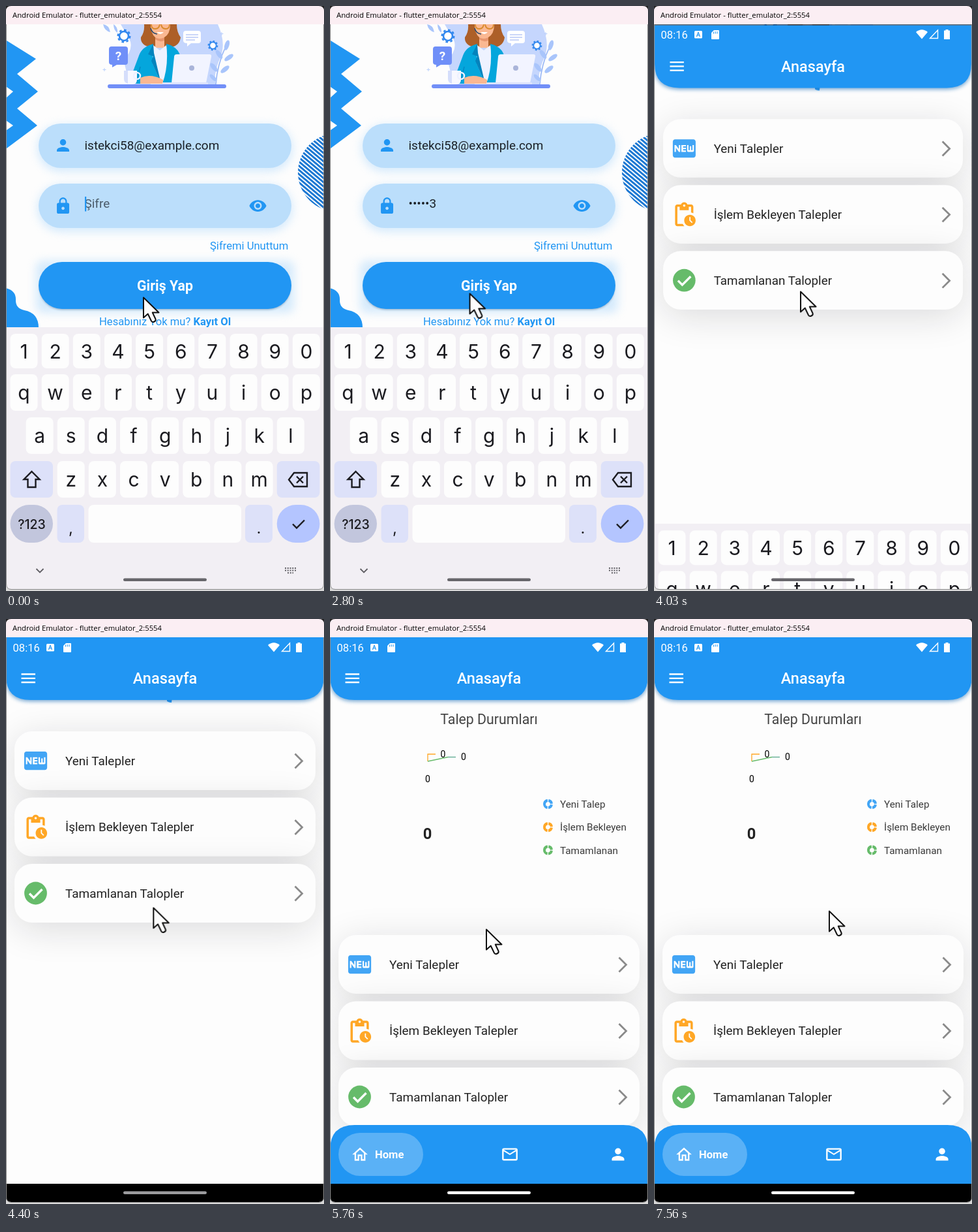
Recreate the animation shown at these times as an HTML page. Size 488 by 896 pixels, loop 7660 ms.

```html
<!DOCTYPE html>
<html lang="tr">
<head>
<meta charset="utf-8">
<title>Anasayfa</title>
<style>
html, body { margin: 0; width: 100%; height: 100%; overflow: hidden; background: #d9d9d9; }
svg { display: block; font-family: Roboto, sans-serif; }
.mid { text-anchor: middle; }
.blue { fill: #2196f3; }
.white { fill: #fff; }
.page { fill: #fdfdfd; }
.b { font-weight: 700; }
.t16 { font-size: 16.6px; }
.t19 { font-size: 18.95px; }
.t21 { font-size: 21.3px; }
.t15 { font-size: 15.3px; }
.t14 { font-size: 14px; }
.keys { font-family: Inter, sans-serif; font-size: 30px; fill: #1b1b20; text-anchor: middle; }

.login, .home, .fade, .scrim, .keys, .before, .after, .late, .early, .cards,
.bar, .pill, .cursor, .ripple, .arc, .spin { animation: 7660ms linear infinite; }
.login, .home { transform-origin: 244px 460px; }
.login { animation-name: zoomOut; }
.home { animation-name: zoomIn; }
.fade { animation-name: fadeIn; }
.scrim { animation-name: dim; }
.keys { animation-name: drop; }
.before { animation-name: idle; }
.after { animation-name: busy; }
.early { animation-name: early; }
.late { animation-name: late; }
.cards { animation-name: push; }
.bar { animation-name: bar; }
.pill { animation-name: pill; }
.cursor { animation-name: move; }
.ripple { animation-name: ripple; transform-origin: 216px 438px; }
.arc { animation-name: arc; }
.spin { animation-name: spin; transform-origin: 157px 428px; }

@keyframes zoomOut {
  0%, 50.31% { transform: scale(1); animation-timing-function: cubic-bezier(.3,0,.8,.15); }
  50.97% { transform: scale(1.02); animation-timing-function: cubic-bezier(.05,.7,.1,1); }
  54.23%, 100% { transform: scale(1.05); }
}
@keyframes zoomIn {
  0%, 50.31% { transform: scale(.85); animation-timing-function: cubic-bezier(.3,0,.8,.15); }
  50.97% { transform: scale(.91); animation-timing-function: cubic-bezier(.05,.7,.1,1); }
  54.23%, 100% { transform: scale(1); }
}
@keyframes fadeIn { 0%, 50.8% { opacity: 0; } 51.29%, 100% { opacity: 1; } }
@keyframes dim { 0%, 51.12% { opacity: 0; } 51.95%, 100% { opacity: .6; } }
@keyframes drop {
  0%, 50.47% { transform: translateY(0); animation-timing-function: cubic-bezier(.4,0,1,1); }
  53.08%, 100% { transform: translateY(410px); }
}
@keyframes idle { 0%, 37.59% { opacity: 1; } 37.6%, 100% { opacity: 0; } }
@keyframes busy { 0%, 37.59% { opacity: 0; } 37.6%, 100% { opacity: 1; } }
@keyframes early { 0%, 72.18% { opacity: 1; } 72.19%, 100% { opacity: 0; } }
@keyframes late { 0%, 72.18% { opacity: 0; } 72.19%, 100% { opacity: 1; } }
@keyframes push { 0%, 72.18% { transform: translateY(0); } 72.19%, 100% { transform: translateY(312px); } }
@keyframes bar { 0%, 53.51% { opacity: 0; } 53.52%, 100% { opacity: 1; } }
@keyframes pill { 0%, 53.52% { fill: #67666b; } 64.75%, 100% { fill: #fff; } }
@keyframes ripple {
  0%, 37.2% { transform: scale(0); opacity: .14; }
  41% { transform: scale(1); opacity: .1; }
  43.08%, 100% { transform: scale(1); opacity: 0; }
}
@keyframes arc {
  0%, 37.6% { stroke-dasharray: 0 360; stroke-dashoffset: 0; animation-timing-function: cubic-bezier(.4,0,.2,1); }
  46.31% { stroke-dasharray: 270 360; stroke-dashoffset: 0; animation-timing-function: cubic-bezier(.4,0,.2,1); }
  55%, 100% { stroke-dasharray: 0 360; stroke-dashoffset: -270; }
}
@keyframes spin { 0%, 37.6% { transform: rotate(-90deg); } 55%, 100% { transform: rotate(216deg); } }
@keyframes move {
  0%, 2.09% { transform: translate(209px,445px); }
  4.7%, 33.42% { transform: translate(209px,444.5px); }
  36.55% { transform: translate(212.5px,439px); }
  43.08% { transform: translate(221px,436px); }
  45.69% { transform: translate(222px,436px); }
  52.61% { transform: translate(223px,436px); }
  63.45% { transform: translate(226px,447px); }
  66.58% { transform: translate(235px,464px); }
  69.97%, 77.42% { transform: translate(238px,474px); }
  83.55%, 87.47% { transform: translate(295px,495px); }
  88.25% { transform: translate(289px,494px); }
  95.3%, 100% { transform: translate(267px,446px); }
}
</style>
</head>
<body>
<svg width="488" height="896" viewBox="0 0 488 896">
<defs>
  <clipPath id="screen"><path d="M0 28H488V885Q488 893 480 893H8Q0 893 0 885Z"/></clipPath>
  <clipPath id="button"><rect x="50" y="392" width="388" height="72" rx="36"/></clipPath>
  <pattern id="stripes" width="6" height="4.9" patternUnits="userSpaceOnUse" patternTransform="rotate(40)">
    <rect width="6" height="2.900" fill="#1976d2"/>
  </pattern>
  <path id="person" d="M12 12c2.21 0 4-1.79 4-4s-1.79-4-4-4-4 1.79-4 4 1.79 4 4 4zm0 2c-2.67 0-8 1.34-8 4v2h16v-2c0-2.66-5.33-4-8-4z"/>
  <path id="chevron" d="M443.5 206.5l11 11-11 11" fill="none" stroke="#8a8a8a" stroke-width="2.8"/>
  <circle id="ring" r="5.500" fill="none" stroke-width="4" pathLength="100" stroke-dasharray="46 4 21 4 21 4" transform="rotate(98)"/>
  <g id="gear" fill="none" stroke="#2f86ee">
    <circle r="7" stroke-width="2.6" fill="#fff"/>
    <circle r="9.3" stroke-width="2.4" pathLength="80" stroke-dasharray="5 5"/>
  </g>
  <g id="sprig" fill="#a9c5fb">
    <path d="M0 0Q2-30 16-60" fill="none" stroke="#8fb0f5" stroke-width="1.5"/>
    <ellipse cx="17" cy="-60" rx="3.5" ry="8" transform="rotate(18 17 -60)"/>
    <ellipse cx="5" cy="-46" rx="3.5" ry="8" transform="rotate(-35 5 -46)"/>
    <ellipse cx="20" cy="-41" rx="3.5" ry="8" transform="rotate(55 20 -41)"/>
    <ellipse cx="-3" cy="-26" rx="3.5" ry="8" transform="rotate(-40 -3 -26)"/>
    <ellipse cx="14" cy="-23" rx="3.5" ry="8" transform="rotate(52 14 -23)"/>
    <ellipse cx="-4" cy="-10" rx="3" ry="7" transform="rotate(-45 -4 -10)"/>
  </g>
</defs>

<rect width="488" height="30" fill="#222"/>
<path d="M0 30V8Q0 0 8 0H480Q488 0 488 8V30Z" fill="#fbeef3"/>
<text x="10" y="18" font-size="11.3" style="font-family:'Open Sans',sans-serif">Android Emulator - flutter_emulator_2:5554</text>

<g clip-path="url(#screen)">
<g class="login">
  <rect class="page" y="28" width="488" height="868"/>
  <path class="blue" d="M1 53L46 81 17 104 49 131 17 157 48 183 1 218V190L11 183 1 176V140L11 131 1 124Z"/>
  <circle cx="508" cy="255" r="60" fill="url(#stripes)"/>
  <path class="blue" d="M0 432Q15 436 15 449Q14 463 28 466Q50 470 50 493H0Z"/>

  <g>
    <path d="M176 28H325Q340 60 326 86Q318 108 322 121H188Q186 100 180 84Q196 66 190 52Z" fill="#c5d6fd"/>
    <path d="M149 28Q158 29 160 40Q151 38 149 28ZM165 28q7 4 6 13-6-4-6-13Z" fill="#a9c5fb"/>
    <use href="#sprig" transform="translate(322 120)"/>
    <path d="M212 28H262Q262 40 268 48Q266 62 252 63H222Q206 60 207 48Q213 40 212 28Z" fill="#ad5f28"/>
    <path d="M222 28H252Q252 43 243 48V64H229V48Q222 42 222 28Z" fill="#fab892"/>
    <path d="M229 48Q236 52 243 48V53Q236 56 229 51Z" fill="#e8966f"/>
    <path d="M223 28q0 7 6 7t7-7m2 0q1 7 7 7t6-7" fill="none" stroke="#d98a2b" stroke-width="1.8"/>
    <path d="M231 40q6 6 11 0Z" class="white"/>
    <path d="M222 34q2 8 10 9" fill="none" stroke="#26496f" stroke-width="1.5"/>
    <path d="M226 60L236 68 246 60 254 80 248 120H222L218 76Z" fill="#eef2ff"/>
    <path d="M226 58Q209 62 204 76L192 108Q192 119 202 119H238L225 88Z" fill="#04a6dc"/>
    <path d="M246 58Q264 62 268 78V119H240Q250 92 246 58Z" fill="#04a6dc"/>
    <path d="M226 58L218 74 226 77 223 84 238 119 227 72Z" fill="#0483bd"/>
    <path d="M206 110Q222 103 241 113V119H206Z" fill="#fab892"/>
    <path d="M206 93L200 118" stroke="#0389c4" stroke-width="1.5"/>
    <path d="M262 74H312Q316 74 315 78L307 118H254L258 78Q258 74 262 74Z" fill="#f2f4ff"/>
    <path d="M240 117H310V121H240Z" fill="#dbe2fc"/>
    <circle cx="285" cy="95" r="4" fill="#a9b4d9"/>
    <path d="M181 99H201V113Q201 120 194 120H188Q181 120 181 113Z" fill="#f7f8ff"/>
    <circle cx="201" cy="107" r="5" fill="none" stroke="#eef1ff" stroke-width="2.5"/>
    <path d="M181 99H187V119Q181 117 181 112Z" fill="#d5defb"/>
    <path d="M162 62H183Q187 62 187 66V86Q187 90 183 90H170L163 94V90Q158 90 158 86V66Q158 62 162 62Z" fill="#6f8ff8"/>
    <text x="172.5" y="83" class="white b mid" font-size="19">?</text>
    <path d="M276 38H295Q299 38 299 42V53Q299 57 295 57H284L278 62V57Q272 57 272 53V42Q272 38 276 38Z" fill="#fff"/>
    <path d="M276 44H295M276 48H295M276 52H290" stroke="#b9c9f6" stroke-width="1.5"/>
    <use href="#gear" x="181" y="46"/>
    <use href="#gear" transform="translate(317.5 60.5) scale(.75)"/>
    <path d="M151 95v5m-2.5-2.5h5M331 40v5m-2.5-2.5h5" stroke="#b9cffc"/>
    <rect x="156" y="120" width="182" height="6" rx="3" fill="#728ff7"/>
  </g>

  <g fill="#bbdefb">
    <g opacity=".6" style="filter:blur(7px)">
      <rect x="48" y="182" width="392" height="72" rx="36"/>
      <rect x="48" y="274" width="392" height="72" rx="36"/>
      <rect x="46" y="390" width="396" height="80" rx="10"/>
    </g>
    <rect x="50" y="180" width="388" height="68" rx="34"/>
    <rect x="50" y="272" width="388" height="68" rx="34"/>
  </g>
  <g class="blue">
    <use href="#person" transform="translate(73.3 199.3) scale(1.186)"/>
    <path transform="translate(73.3 292) scale(1.186)" d="M18 8h-1V6c0-2.76-2.24-5-5-5S7 3.24 7 6v2H6c-1.1 0-2 .9-2 2v10c0 1.1.9 2 2 2h12c1.1 0 2-.9 2-2V10c0-1.1-.9-2-2-2zm-6 9c-1.1 0-2-.9-2-2s.9-2 2-2 2 .9 2 2-.9 2-2 2zm3.1-9H8.9V6c0-1.71 1.39-3.1 3.1-3.1 1.71 0 3.1 1.39 3.1 3.1v2z"/>
    <path transform="translate(372.3 291.8) scale(1.186)" d="M12 4.5C7 4.5 2.73 7.61 1 12c1.73 4.39 6 7.5 11 7.5s9.27-3.11 11-7.5c-1.73-4.39-6-7.5-11-7.5zM12 17c-2.76 0-5-2.24-5-5s2.24-5 5-5 5 2.24 5 5-2.24 5-5 5zm0-8c-1.66 0-3 1.34-3 3s1.34 3 3 3 3-1.34 3-3-1.34-3-3-3z"/>
  </g>
  <text x="120.5" y="220" class="t19" fill="#1b2127">istekci58@example.com</text>
  <text id="secret" x="120.5" y="309" class="t19"></text>
  <rect id="caret" class="blue" y="292" width="2.2" height="22.5"/>
  <text x="313" y="373" class="t16 blue">Şifremi Unuttum</text>

  <rect x="51" y="395" width="386" height="70.500" rx="35" fill="#35608a" opacity=".4" style="filter:blur(1.5px)"/>
  <rect class="blue" x="50" y="392" width="388" height="72" rx="36"/>
  <g clip-path="url(#button)"><circle class="ripple white" cx="216" cy="438" r="230"/></g>
  <text x="244" y="436" class="before t21 b white mid">Giriş Yap</text>
  <g class="after">
    <text x="193" y="436" class="t21 b white">Giriş Yapılıyor...</text>
    <g class="spin"><circle class="arc" cx="157" cy="428" r="12.3" pathLength="360" fill="none" stroke="#fff" stroke-width="4.2"/></g>
  </g>
  <text x="143" y="489" class="t16 blue">Hesabınız Yok mu? <tspan class="b">Kayıt Ol</tspan></text>
</g>

<rect class="scrim" y="28" width="488" height="868"/>

<g class="fade">
<g class="home">
  <rect class="page" y="28" width="488" height="868"/>
  <path class="early blue" d="M247 120H255L254 128Q250 128 247 126Z"/>

  <g class="late">
    <text x="244" y="161" class="t21 mid" fill="#454545">Talep Durumları</text>
    <g fill="none" stroke-width="1.3">
      <path d="M162 207H150V218" stroke="#ffa726"/>
      <path d="M150 218L181 211.5" stroke="#66bb6a"/>
      <path d="M181 211.5H193" stroke="#5aa98f"/>
    </g>
    <g class="t14 mid">
      <text x="173.5" y="212">0</text><text x="205" y="216">0</text><text x="150" y="250">0</text>
    </g>
    <text x="149.5" y="337" class="b mid" font-size="23.7" fill="#222">0</text>
    <use href="#ring" x="334.5" y="283.5" stroke="#42a5f5"/>
    <use href="#ring" x="334.5" y="318.7" stroke="#ffa726"/>
    <use href="#ring" x="334.5" y="354" stroke="#66bb6a"/>
    <g class="t15" fill="#3a3a3a">
      <text x="353" y="289">Yeni Talep</text><text x="353" y="324">İşlem Bekleyen</text><text x="353" y="360">Tamamlanan</text>
    </g>
  </g>

  <g class="cards">
    <g id="panels"></g>
    <path fill="#42a5f5" transform="translate(24.4 196) scale(1.76)" d="M20 4H4c-1.11 0-1.99.89-1.99 2L2 18c0 1.11.89 2 2 2h16c1.11 0 2-.89 2-2V6c0-1.11-.89-2-2-2zM8.5 15H7.3l-2.55-3.5V15H3.5V9h1.2l2.6 3.5V9h1.2v6zm5-4.74H11v1.12h2.5v1.26H11v1.11h2.5V15h-4V9h4v1.26zm7 3.74c0 .55-.45 1-1 1h-4c-.55 0-1-.45-1-1V9h1.25v4.51h1.13V9.99h1.25v3.51h1.12V9h1.25v5z"/>
    <path fill="#ffa726" transform="translate(24.4 298) scale(1.76)" d="M17 12c-2.76 0-5 2.24-5 5s2.24 5 5 5 5-2.24 5-5-2.24-5-5-5zm1.65 7.35L16.5 17.2V14h1v2.79l1.85 1.85-.7.71zM18 3h-3.18C14.4 1.84 13.3 1 12 1s-2.4.84-2.82 2H6c-1.1 0-2 .9-2 2v15c0 1.1.9 2 2 2h6.11c-.59-.57-1.07-1.25-1.42-2H6V5h2v3h8V5h2v5.08c.71.1 1.38.31 2 .6V5c0-1.1-.9-2-2-2zm-6 2c-.55 0-1-.45-1-1s.45-1 1-1 1 .45 1 1-.45 1-1 1z"/>
    <circle cx="45.5" cy="420" r="17.4" fill="#66bb6a"/>
    <path d="M36 420.5l6.5 6.5 13-13" fill="none" stroke="#fff" stroke-width="3.4"/>
  </g>

  <path d="M0 28H488V90Q488 126 450 126H38Q0 126 0 90Z" fill="#1c6fb8" opacity=".65" style="filter:blur(3px)"/>
  <path class="blue" d="M0 28H488V87Q488 124 450 124H38Q0 124 0 87Z"/>
  <text x="244" y="99" class="white mid" font-size="23.6" font-weight="500">Anasayfa</text>
  <path d="M23.5 84.5h21.5M23.5 90.8h21.5M23.5 97h21.5" stroke="#fff" stroke-width="2.3"/>

  <g class="late">
    <path class="blue" d="M0 865V813Q0 775 38 775H450Q488 775 488 813V865Z"/>
    <rect class="white" x="13" y="787" width="130" height="66" rx="33" opacity=".26"/>
    <g class="white">
      <path transform="translate(31.8 806) scale(1.186)" d="M12 5.69l5 4.5V18h-2v-6H9v6H7v-7.81l5-4.5M12 3L2 12h3v8h6v-6h2v6h6v-8h3L12 3z"/>
      <path transform="translate(261.8 805.7) scale(1.186)" d="M22 6c0-1.1-.9-2-2-2H4c-1.1 0-2 .9-2 2v12c0 1.1.9 2 2 2h16c1.1 0 2-.9 2-2V6zm-2 0-8 5-8-5h16zm0 12H4V8l8 5 8-5v10z"/>
      <use href="#person" transform="translate(427.8 805.7) scale(1.186)"/>
      <text x="69" y="825.5" class="t16 b">Home</text>
    </g>
  </g>
</g>

<!-- The status bar does not zoom with the page. -->
<g class="white">
  <text x="10.5" y="50" class="t16">08:16</text>
  <rect x="62" y="38" width="12" height="11.5" rx="1.5"/>
  <path d="M92 37H99Q100 37 100 38V50Q100 51 99 51H89Q88 51 88 50V41Z"/>
  <path d="M402 40Q411 32.5 420 40L411 50.5Z"/>
  <path d="M435.5 37V49.5H423.5Z" fill="none" stroke="#fff" stroke-width="1.4"/>
  <path d="M447.5 36H451.5V37.5H454V51H445V37.5H447.5Z"/>
</g>
<text x="68" y="47.3" class="blue b mid" font-size="9.5">A</text>
<path d="M91.5 39.5v3M94.2 39v3.5M97 39v3.5" stroke="#2196f3"/>
</g>

<g class="keys" id="keys"></g>
<rect class="bar" y="865" width="488" height="30"/>
<rect class="pill" x="180" y="876.5" width="128" height="4.6" rx="2.3"/>
</g>

<path d="M.5 28V885Q.5 893.5 8 893.5H480Q487.5 893.5 487.5 885V28" fill="none" stroke="#8d8d8d"/>
<path class="cursor" d="M2 1.5V32.5L8.7 26.5 14 37.5Q15.5 40 18.5 38.5 21.5 37 20.5 34.5L15.8 24.5H25.5Z" fill="#fdfdfd" stroke="#111" stroke-width="2" stroke-linejoin="round"/>
</svg>

<script>
const $ = id => document.getElementById(id);
const LOOP = 7660;

$('panels').innerHTML = ['Yeni Talepler', 'İşlem Bekleyen Talepler', 'Tamamlanan Talopler'].map((label, i) => {
  const y = 172 + i * 101.5;
  const box = (dy, attrs) => `<rect x="13" y="${y + dy}" width="462" height="90" rx="27" ${attrs}/>`;
  return box(10, 'fill="#14141c" opacity=".14" style="filter:blur(28px)"') + box(0, 'class="page"') +
    `<text x="91" y="${y + 51.5}" class="t19" fill="#222">${label}</text><use href="#chevron" y="${i * 101.5}"/>`;
}).join('');

const key = (x, y, w, h, label = '', fill = '#fdfdfd', r = 8) =>
  `<rect x="${x}" y="${y}" width="${w}" height="${h}" rx="${r}" fill="${fill}"/>` +
  `<text x="${x + w / 2}" y="${y + h / 2 + 11}">${label}</text>`;
const row = (chars, x, y, h) => [...chars].map((c, i) => key(x + i * 48.15, y, 42, h, c)).join('');
const line = (d, width = 2.4, color = '#1b1b20') =>
  `<path d="${d}" fill="none" stroke="${color}" stroke-width="${width}"/>`;
const tint = '#dde1f9';
const dots = [0, 1, 2].map(r => `M${428 + (r > 1 ? 4 : 0)} ${861 + r * 3.6}h${r > 1 ? 9 : 17}`).join('');

$('keys').innerHTML =
  '<rect y="492" width="488" height="410" fill="#f2eff4"/>' +
  row('1234567890', 6.5, 502, 53) + row('qwertyuiop', 6.5, 564, 56) +
  row('asdfghjkl', 30.6, 630, 56) + row('zxcvbnm', 78.7, 697, 56) +
  key(6.5, 697, 65.5, 56, '', tint) + key(415.7, 697, 65.8, 56, '', tint) +
  key(6.5, 764, 65.5, 58, '', '#c2c6dd', 29) + key(78.5, 764, 41.5, 58, '', tint) +
  key(126.5, 764, 234.5, 58) + key(367, 764, 42, 58, '', tint) +
  key(415.7, 764, 65.8, 58, '', '#b4c5ff', 29) +
  '<text x="39.5" y="801" font-size="19.5" font-weight="500">?123</text>' +
  '<text x="99.5" y="808" font-size="24">,</text><text x="388" y="808" font-size="24">.</text>' +
  line('M39.5 713L51.5 725H45.5V737H33.5V725H27.5Z') +
  line('M442 715H462V736H442L434 725.5ZM446 720.5l10 10m0-10l-10 10') +
  line('M440 793.5l6 6 12-12') + line('M46.5 862l5.5 5.5 5.5-5.5', 1.8, '#5f5e63') +
  `<path d="${dots}" stroke="#5f5e63" stroke-width="2" stroke-dasharray="2 1.75"/>`;

// Each entry: key time and the text shown from then on.
const typed = [[0, 'Şifre'], [200, '1'], [600, '•2'], [1560, '••3'], [1650, '•••1'],
  [1740, '••••2'], [1830, '•••••3'], [3330, '••••••']];
const secret = $('secret'), caret = $('caret');
let start;

function draw(now) {
  start ??= now;
  const t = (now - start) % LOOP;
  const [since, text] = typed.findLast(([time]) => time <= t);
  const hint = since === 0;
  if (secret.textContent !== text) secret.textContent = text;
  secret.setAttribute('fill', hint ? '#4b5b69' : '#1b2127');
  caret.setAttribute('x', 121 + (hint ? 0 : secret.getComputedTextLength()));
  caret.setAttribute('opacity', t < 3330 && (t - since) % 1000 < 500 ? 1 : 0);
  requestAnimationFrame(draw);
}
requestAnimationFrame(draw);
</script>
</body>
</html>
```
